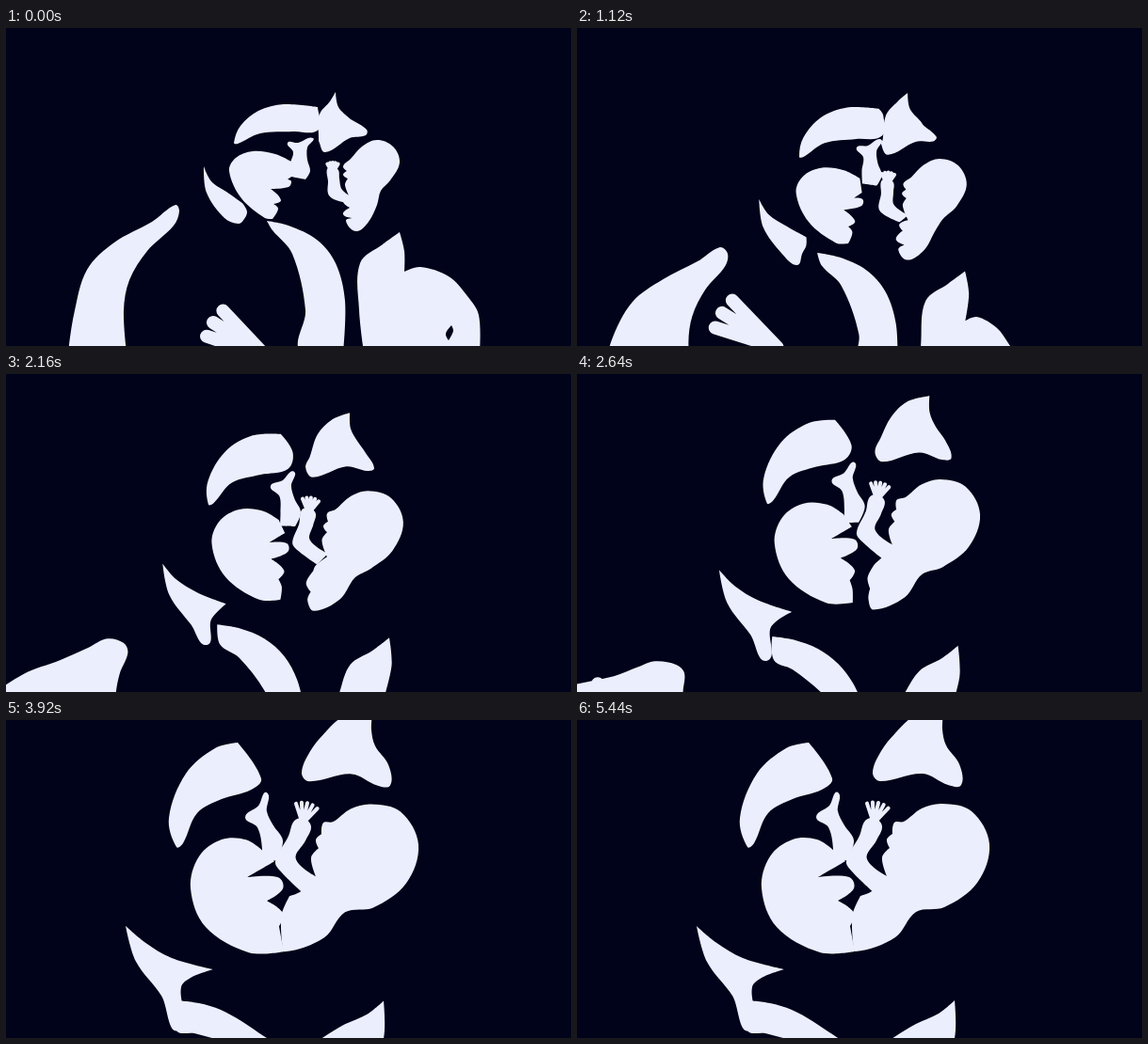
Write an HTML page with a canvas that moves like this. It is 600 px wide and 338 px high and loops after 5520 ms.

```html
<!DOCTYPE html>
<html lang="en">
<head>
<meta charset="utf-8">
<title>Embrace</title>
<style>
html, body { margin: 0; height: 100%; overflow: hidden; background: #000319; }
canvas { display: block; width: 600px; height: 338px; }
</style>
</head>
<body>
<canvas id="stage" width="600" height="338"></canvas>
<script>
const ctx = document.getElementById('stage').getContext('2d');
const LOOP = 5520, STEP = 80, MORPH = 3300;
const DARK = '#000319', LIGHT = '#ebeefc';
const parts = [];

const points = text => text.split(' ').map(p => p.split(',').map(Number));

// A part morphs between two outlines; on the way it sags by an offset and returns
function part(from, to, sag, options = {}) {
  parts.push({ from: points(from), to: points(to), sag, draw: blob, color: LIGHT, corners: [], ...options });
}

// Closed smooth curve through the points, sharp at the corners
function blob(pts, { color, corners }) {
  const n = pts.length;
  const handle = (i, len) => {
    const [x, y] = pts[i];
    if (corners.includes(i)) return [x, y];
    const a = pts[(i + n - 1) % n], b = pts[(i + 1) % n];
    const k = len / (Math.hypot(b[0] - a[0], b[1] - a[1]) || 1);
    return [x + (b[0] - a[0]) * k, y + (b[1] - a[1]) * k];
  };
  ctx.fillStyle = color;
  ctx.beginPath();
  ctx.moveTo(...pts[0]);
  pts.forEach((p, i) => {
    const j = (i + 1) % n, q = pts[j];
    const len = Math.hypot(q[0] - p[0], q[1] - p[1]) / 3;
    ctx.bezierCurveTo(...handle(i, len), ...handle(j, -len), ...q);
  });
  ctx.fill();
}

// Fingers fan out evenly from the palm around the middle fingertip
function fingers([palm, tip], { color, count, spread, width }) {
  const dx = tip[0] - palm[0], dy = tip[1] - palm[1];
  const length = Math.hypot(dx, dy), middle = Math.atan2(dy, dx);
  ctx.strokeStyle = color;
  ctx.lineWidth = width;
  ctx.lineCap = 'round';
  ctx.beginPath();
  for (let i = 0; i < count; i++) {
    const a = middle + (i - (count - 1) / 2) * spread;
    ctx.moveTo(...palm);
    ctx.lineTo(palm[0] + length * Math.cos(a), palm[1] + length * Math.sin(a));
  }
  ctx.stroke();
}

// Upper left petal
part('242,122 249,104 268,88 295,81 331,84 332,108 305,110 270,112 246,123',
     '181,135 173,104 191,57 222,30 246,24 271,62 260,74 229,84 203,99 188,131',
     [5, 13], { corners: [4] });

// Upper right petal
part('350,68 353,84 366,97 383,108 382,114 365,117 339,132 332,120 333,92 344,78',
     '389,-8 388,10 392,27 406,47 408,69 394,69 367,57 322,65 314,56 323,33 338,14 357,-3',
     [-6, 15], { corners: [0] });

// Left face, later the curled body
part('237,152 244,138 262,131 286,134 303,142 303,158 299,161 303,163 300,169 281,171 292,183 284,187 289,192 283,203 275,202 250,181',
     '196,179 205,145 229,127 255,127 272,138 285,150 256,167 289,167 294,179 277,192 294,205 290,219 292,230 295,246 258,247 212,220',
     [3, 19], { corners: [4, 5, 6, 9, 11, 13] });

// Nose, later the leg and foot
part('326,117 320,127 320,140 323,152 318,161 303,158 302,144 305,132 299,122 310,122',
     '277,77 277,97 284,112 294,128 287,149 270,151 272,137 267,114 254,103 268,91',
     [6, 9], { corners: [4, 5] });

// Right face, later the large head
part('394,119 411,126 418,143 408,162 398,173 394,188 385,206 372,216 361,205 369,202 358,198 365,191 358,184 366,182 360,167 363,160 358,156 362,152 358,147 366,139 378,126',
     '388,89 419,97 438,132 425,173 390,199 360,204 338,231 296,246 293,235 292,220 293,205 301,187 313,182 329,166 324,146 332,136 329,127 335,121 337,109 347,108 366,94',
     [-8, 26], { corners: [9, 11, 13, 15, 17] });

// Small arm and hand
part('341,150 342,163 342,176 348,182 362,186 370,181 357,172 354,160 353,151 347,148',
     '306,107 300,123 286,150 292,161 318,186 333,168 308,148 318,128 324,113 316,104',
     [-12, 21], { corners: [4, 5] });
part('347,154 347,143', '315,110 320,88',
     [-12, 21], { draw: fingers, count: 5, spread: 0.27, width: 4 });

// Collar
part('210,147 218,163 234,174 251,186 256,195 253,203 247,208 232,202 213,175',
     '127,219 147,236 176,253 220,265 196,274 186,284 184,330 165,293 138,257',
     [-2, 23], { corners: [0, 3] });

// Left sleeve
part('180,188 184,195 178,210 150,237 131,268 125,300 128,345 66,345 72,305 86,257 115,228 155,206',
     '45,344 75,346 90,352 100,370 110,385 115,395 120,400 -120,390 -100,360 -40,352 10,350 30,345',
     [-5, 18], { corners: [6, 7] });

// Lapel
part('277,205 300,210 330,225 350,250 360,290 358,345 313,345 318,300 304,240 283,215',
     '181,298 205,301 228,308 250,320 268,332 285,343 262,350 240,344 200,333 181,330',
     [-5, 18], { corners: [0, 5] });

// Right shoulder
part('418,217 423,237 423,259 440,254 470,264 490,285 502,305 503,345 380,345 375,300 376,250 400,230',
     '401,298 401,338 380,400 370,400 350,420 330,420 330,420 300,420 310,355 337,337 360,323 384,312',
     [-3, 28], { corners: [0, 2, 7, 8] });
part('473,316 475,322 470,332 467,325', '300,470 302,476 297,486 294,479',
     [-3, 28], { color: DARK, corners: [0, 2] });

// Large hand
part('275,348 220,313', '5,420 -70,376',
     [-15, -22], { draw: fingers, count: 3, spread: 0.25, width: 14 });

function frame(now) {
  const t = Math.floor((now % LOOP) / STEP) * STEP;
  const u = Math.min(t / MORPH, 1);
  const morph = u ** 1.6;
  const dip = Math.sin(Math.PI * u ** 0.8);
  const tilt = 0.03 * Math.exp(-(((t - 3200) / 450) ** 2));

  ctx.setTransform(1, 0, 0, 1, 0, 0);
  ctx.fillStyle = DARK;
  ctx.fillRect(0, 0, 600, 338);
  ctx.setTransform(1, tilt, 0, 1, 0, -200 * tilt);
  for (const p of parts) {
    // Extra points of the fuller outline grow out of the nearest point in order
    const n = Math.max(p.from.length, p.to.length);
    const pick = (list, i) => list[Math.round(i * (list.length - 1) / (n - 1))];
    const pts = Array.from({ length: n }, (_, i) => {
      const a = pick(p.from, i), b = pick(p.to, i);
      return [0, 1].map(k => a[k] + (b[k] - a[k]) * morph + p.sag[k] * dip);
    });
    p.draw(pts, p);
  }
}

let start;
requestAnimationFrame(function tick(now) {
  start ??= now;
  frame(now - start);
  requestAnimationFrame(tick);
});
</script>
</body>
</html>
```
